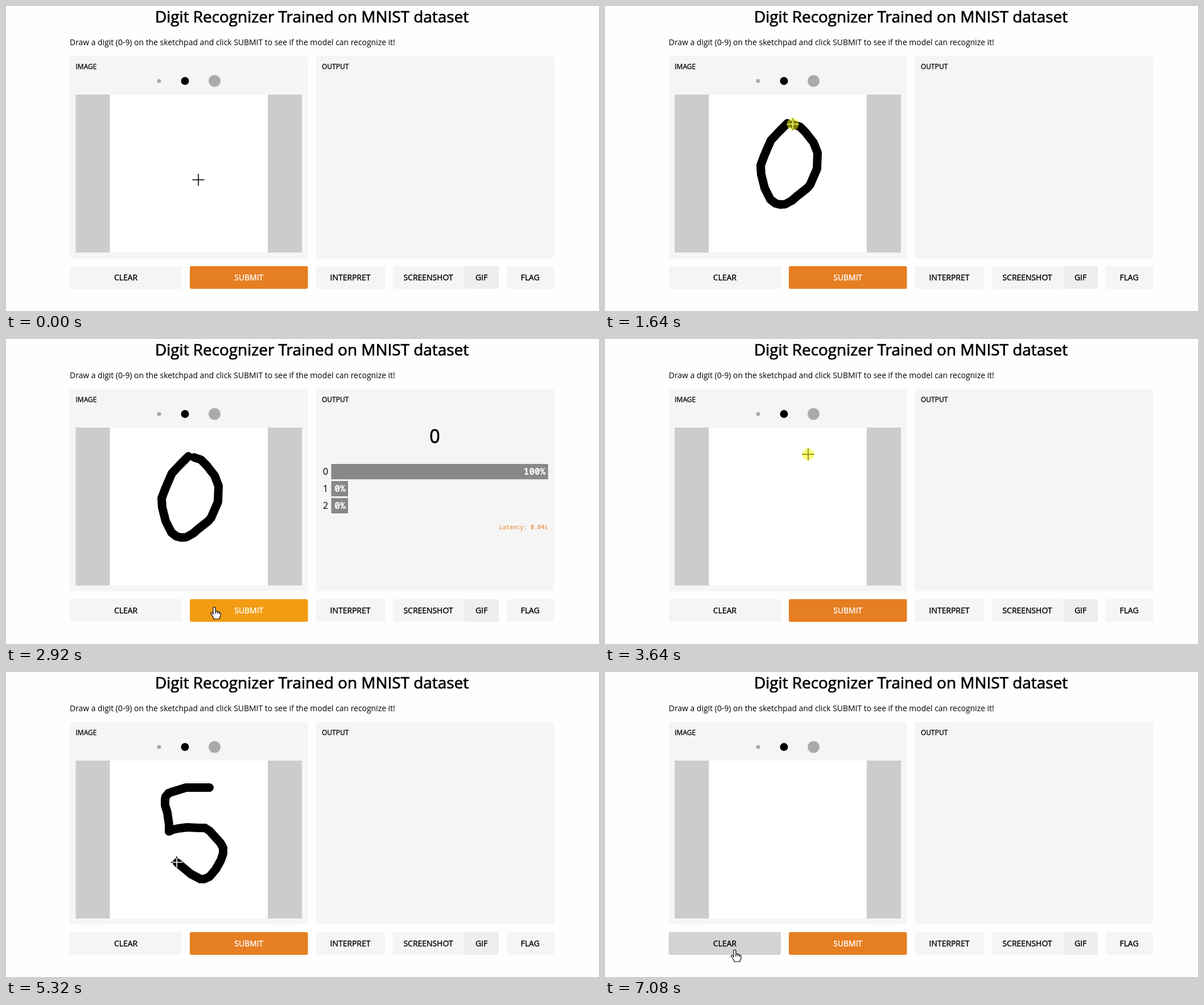
Recreate the animation shown at these times as an HTML page. Size 1042x537 px, loop 7.12 s.

```html
<!DOCTYPE html>
<html lang="en">
<head>
<meta charset="utf-8">
<title>Digit Recognizer</title>
<style>
  html, body { margin: 0; width: 100%; height: 100%; overflow: hidden; background: #fefefe; }
  svg { display: block; width: 1042px; height: 537px; background: #fefefe; }
  text { font: 13.93px "Open Sans", sans-serif; fill: currentColor; }
  .bold { stroke: currentColor; stroke-width: .026em; }
  .mid { text-anchor: middle; }
  .end { text-anchor: end; }
  .mono { font: bold 16px "Noto Sans Mono", monospace; fill: #fff; }
  .panel { fill: #f5f5f4; }
  .ink { fill: none; stroke: #000; stroke-width: 15; stroke-linecap: round; stroke-linejoin: round; stroke-dasharray: 1 2; }
  #cross { mix-blend-mode: difference; }
</style>
</head>
<body>
<svg id="stage" viewBox="0 0 1042 537">
  <text class="bold mid" x="537.5" y="29" style="font-size:27.9px">Digit Recognizer Trained on MNIST dataset</text>
  <text x="112" y="69">Draw a digit (0-9) on the sketchpad and click SUBMIT to see if the model can recognize it!</text>

  <rect class="panel" x="112" y="88" width="418.5" height="356" rx="4"/>
  <rect class="panel" x="544.5" y="88" width="418.5" height="356" rx="4"/>
  <text class="bold" x="122.5" y="111" style="font-size:12px">IMAGE</text>
  <text class="bold" x="555" y="111" style="font-size:12px">OUTPUT</text>
  <circle cx="269" cy="132" r="3.5" fill="#aaa"/>
  <circle cx="314.5" cy="132" r="7"/>
  <circle cx="366.5" cy="132" r="10.5" fill="#aaa"/>
  <rect x="122.5" y="156" width="397.5" height="278" fill="#cbcccb"/>
  <rect x="182.5" y="156" width="277.5" height="278" fill="#fff"/>

  <g id="buttons"></g>
  <g id="output">
    <text id="answer" class="bold mid" x="753.5" y="183" style="font-size:32px"></text>
    <g id="bars"></g>
    <text class="mono end" x="952.5" y="335" style="font-weight:400;font-size:10.24px;fill:#e67e22">Latency: 0.04s</text>
  </g>
  <g id="inks" transform="translate(.5 .5)"></g>

  <path id="cross" d="M-10.5 0H10.5M0-10.5V10.5" stroke="#fff" stroke-width="1.6"/>
  <path id="hand" fill="#fff" stroke="#000" stroke-width="1.2" stroke-linejoin="round"
    d="M-2 13V2Q-2 0 0 0T2 2V8Q4 6 5.5 8.5Q8 7.5 8.5 9.5Q11 9 11 11.5V15Q11 17 9 19V21H-1V19L-6 12Q-7 10-5 9.5Q-4 9.5-2 13M2 8V12M5.5 8.5V12M8.5 9.5V12"/>
  <path id="arrow" fill="#fff" stroke="#000" d="M0 0V17L4 13L7 19L9.5 18L7 12H12Z"/>
  <circle id="glow" r="10.5" fill="#ff0" opacity=".5"/>
</svg>
<script>
const LOOP = 7120, STEP = 40;
const byId = id => document.getElementById(id);
const add = (parent, tag, attrs, text = '') => {
  const node = document.createElementNS('http://www.w3.org/2000/svg', tag);
  for (const key in attrs) node.setAttribute(key, attrs[key]);
  node.textContent = text;
  return parent.appendChild(node);
};
const show = (node, on) => node.style.display = on ? '' : 'none';
const within = (t, spans) => spans.some(([a, b]) => t >= a && t < b);

const button = (label, x, width, center, fill = '#f5f5f4', color = '#000') => {
  const box = add(byId('buttons'), 'rect', { x, y: 458, width, height: 40, rx: 3, fill });
  add(byId('buttons'), 'text', { class: 'bold mid', x: center, y: 483, color }, label);
  return box;
};
const clearBox = button('CLEAR', 112, 197, 210.5);
const submitBox = button('SUBMIT', 323, 207.5, 426.8, '#e67e22', '#fff');
button('INTERPRET', 544.5, 121.5, 605);
button('SCREENSHOT', 680, 126, 742);
button('GIF', 806, 60, 835.5, '#eee');
button('FLAG', 880, 83, 921);

const labels = [0, 1, 2].map(i => {
  const y = 220 + 30 * i, right = i ? 601 : 952.5;
  add(byId('bars'), 'rect', { x: 571.5, y, width: right - 571.5, height: 27, fill: '#888' });
  add(byId('bars'), 'text', { class: 'mono end', x: right - 4.5, y: y + 19 }, i ? '0%' : '100%');
  return add(byId('bars'), 'text', { class: 'mid', x: 561.5, y: y + 19, style: 'font-size:16.5px' });
});

// Pointer legs: start, end, path, and for pen strokes the time the ink is cleared
const legs = [
  [40, 280, 'M338 306Q334 240 320 206'],
  [320, 720, 'M320 206L305 221L291 236L284 252L279 264', 3200],
  [720, 1400, 'M279 264L273 280L274 296L280 320L290 340L299 347L307 349L316 348.5L328 342L336 335L355 320L360 314L366 300L372 286L373 258L366 240L352 222L342 212L330 208', 3200],
  [1680, 2080, 'M330 208C312 240 315 330 350 420Q372 470 400 490'],
  [2080, 2160, 'M400 490L425 476'],
  [2760, 2880, 'M425 476L366 472'],
  [2960, 3120, 'M366 472L222 496'],
  [3240, 3480, 'M222 496Q290 330 357 203'],
  [3680, 3880, 'M357 203H316L303 207L290 211L285 213', 7080],
  [4000, 4460, 'M285 213L280 219L279 224V234L283 247L286 268V280', 7080],
  [4460, 4720, 'M286 280L293 277L302 275L318 273L338 274H349', 7080],
  [4720, 5280, 'M349 274L357 279L376 300L381 309V319L377 331L368 347L357 360L348 364H341L324 355L311 344L300 335', 7080],
  [5320, 5440, 'M300 335L375 427'],
  [5440, 5600, 'M375 427L402 463'],
  [6560, 6680, 'M402 463L228 489']
].map(([start, end, d, cleared]) => {
  const path = add(byId('inks'), 'path', { d, class: 'ink' });
  const length = path.getTotalLength();
  path.setAttribute('pathLength', 1);
  return { start, end, cleared, path, length };
});
const presses = [[320, 1680], [2240, 2320], [3160, 3240], [3600, 5320], [5760, 5880], [7040, 7080]];
const results = [[2480, 3200, [0, 1, 2]], [5920, 7080, [5, 0, 1]]];

function draw(t) {
  let x = 338, y = 306;
  for (const { start, end, cleared, path, length } of legs) {
    const p = Math.min(1, Math.max(0, (t - start) / (end - start)));
    show(path, cleared && t >= start && t < cleared);
    path.style.strokeDashoffset = 1 - p;
    if (t >= start) ({ x, y } = path.getPointAtLength(p * length));
  }

  const onPad = x > 182 && x < 460 && y > 156 && y < 434;
  const onRow = y >= 458 && y < 498;
  const onClear = onRow && x > 112 && x < 309;
  const onSubmit = onRow && x > 323 && x < 530;
  clearBox.setAttribute('fill', onClear ? '#d3d3d3' : '#f5f5f4');
  submitBox.setAttribute('fill', onSubmit ? '#f39c12' : '#e67e22');

  const states = { cross: onPad, hand: onClear || onSubmit, glow: within(t, presses) };
  states.arrow = !states.cross && !states.hand;
  for (const id in states) {
    show(byId(id), states[id]);
    byId(id).setAttribute('transform', `translate(${Math.round(x)} ${Math.round(y)})`);
  }

  const result = results.find(span => within(t, [span]));
  show(byId('output'), result);
  if (result) {
    byId('answer').textContent = result[2][0];
    labels.forEach((label, i) => label.textContent = result[2][i]);
  }
}

const origin = performance.now();
function tick() {
  const t = (performance.now() - origin) % LOOP;
  draw(Math.floor(t / STEP) * STEP);
  requestAnimationFrame(tick);
}
tick();
</script>
</body>
</html>
```
